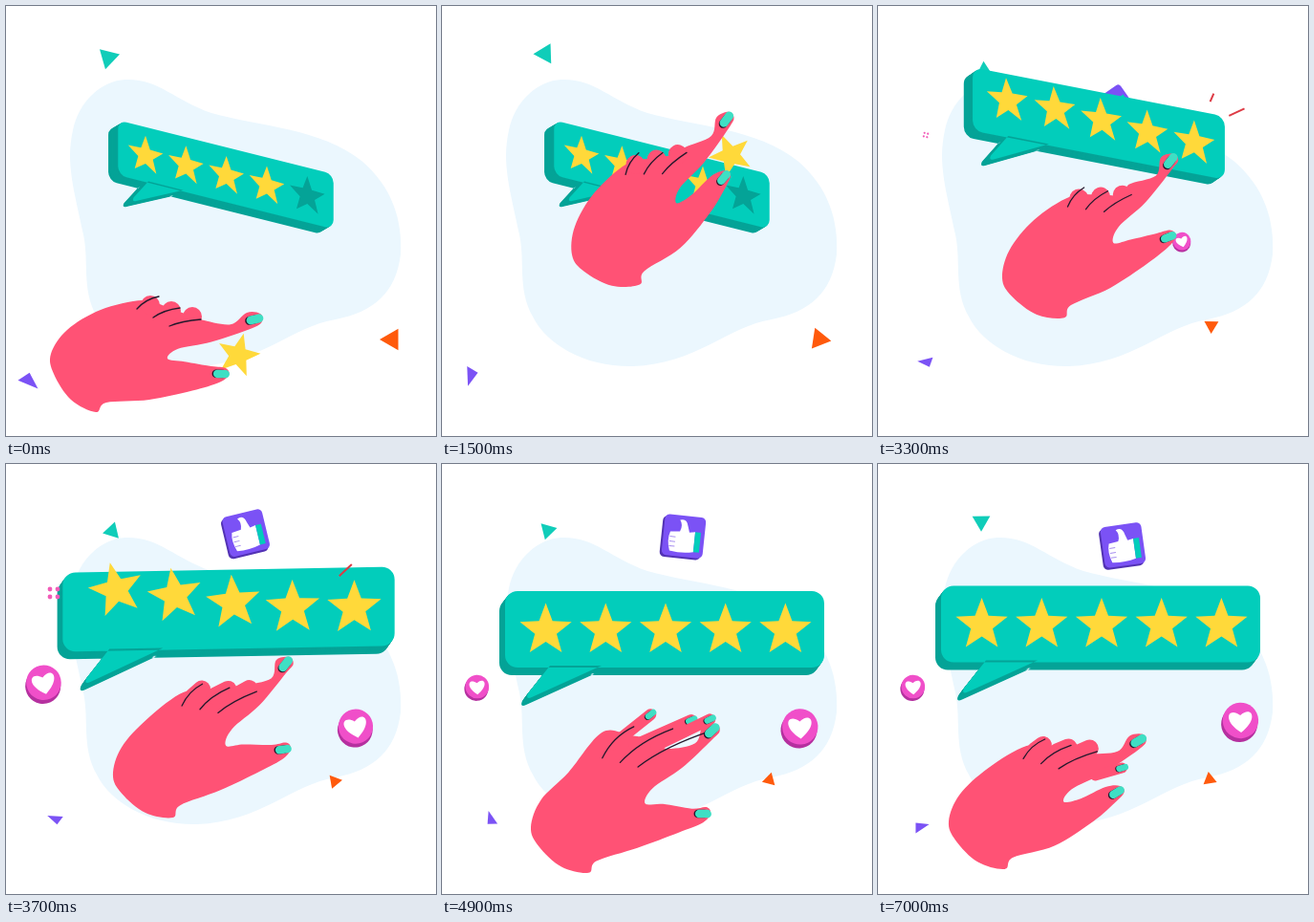
Recreate the animation shown at these times as an HTML page with a canvas. Size 450 by 450 pixels, loop 7100 ms.

```html
<!DOCTYPE html>
<html lang="en">
<head>
<meta charset="utf-8">
<title>Five star rating</title>
<style>
html, body { margin: 0; width: 100%; height: 100%; overflow: hidden; background: #fff; }
canvas { display: block; width: 450px; height: 450px; }
</style>
</head>
<body>
<canvas id="stage" width="450" height="450"></canvas>
<script>
const ctx = document.getElementById('stage').getContext('2d');
const LOOP = 7100, STEP = 100, PLACED = 2800;
const TEAL = '#02cdbb', DARK_TEAL = '#04a397', YELLOW = '#ffd93a', SKIN = '#ff5275',
      NAIL = '#3fdfc4', INK = '#24182c', PURPLE = '#7b52f5', PINK = '#f04fc9', ORANGE = '#ff5a0c';
const RAD = Math.PI / 180;

// Keys are [time, ...values]; monotone cubic between them, so holds stay still.
function at(keys, t) {
  const last = keys.length - 1;
  if (t <= keys[0][0]) return keys[0].slice(1);
  if (t >= keys[last][0]) return keys[last].slice(1);
  let k = 0;
  while (keys[k + 1][0] < t) k++;
  const a = keys[k], b = keys[k + 1], span = b[0] - a[0], u = (t - a[0]) / span, w = 1 - u;
  const slope = (i, c) => (keys[i + 1][c] - keys[i][c]) / (keys[i + 1][0] - keys[i][0]);
  const tangent = (i, c) => {
    if (i === 0) return slope(0, c);
    if (i === last) return slope(last - 1, c);
    const p = slope(i - 1, c), q = slope(i, c);
    return p * q > 0 ? 2 * p * q / (p + q) : 0;
  };
  return a.slice(1).map((v, j) => {
    const c = j + 1;
    return v * (1 + 2 * u) * w * w + b[c] * u * u * (3 - 2 * u)
      + span * u * w * (tangent(k, c) * w - tangent(k + 1, c) * u);
  });
}
const ramp = (t, from, to) => Math.min(1, Math.max(0, (t - from) / (to - from)));

function placed(x, y, angle, scale, draw) {
  ctx.save();
  ctx.translate(x, y);
  ctx.rotate(angle * RAD);
  ctx.scale(scale, scale);
  draw();
  ctx.restore();
}
function fill(color, path) {
  ctx.fillStyle = color;
  path ? ctx.fill(path) : ctx.fill();
}
function line(color, width, x1, y1, x2, y2) {
  ctx.strokeStyle = color;
  ctx.lineWidth = width;
  ctx.beginPath();
  ctx.moveTo(x1, y1);
  ctx.lineTo(x2, y2);
  ctx.stroke();
}
function disc(color, x, y, r) {
  ctx.beginPath();
  ctx.arc(x, y, r, 0, 7);
  fill(color);
}

const blob = new Path2D('M125 77C160 76 175 98 215 112C265 126 330 128 372 162C405 190 415 225 413 260C408 300 385 320 345 328C300 335 265 375 200 377C150 378 110 355 95 325C78 295 88 265 80 235C72 195 62 165 70 130C76 100 100 78 125 77Z');

// Triangles spin steadily while they drift; keys are time, x, y, scale
const even = [[1, 0], [1, 120], [1, 240]];
const triangles = [
  { color: '#10cdb9', corners: even, start: 104, spin: .0494,
    keys: [[0, 107, 54, 12.5], [900, 106, 45, 12.5], [2400, 111, 62, 11.5], [4100, 111, 71, 10], [7000, 108, 60, 10.8]] },
  { color: PURPLE, corners: [[13.5, 0], [10.5, 143], [8.5, -118]], start: 39, spin: .0433,
    keys: [[0, 23, 392, 1], [800, 21, 392, 1], [2400, 46, 375, .77], [4100, 53, 371, .72], [7000, 44, 380, .75]] },
  { color: ORANGE, corners: even, start: 60, spin: .0459,
    keys: [[0, 404, 349, 13], [800, 410, 352, 14], [2400, 365, 341, 10], [4100, 342, 331, 8], [7000, 347, 330, 8.2]] }
];
function drawTriangle({ color, corners, start, spin, keys }, t) {
  const [x, y, scale] = at(keys, t);
  placed(x, y, start + spin * t, scale, () => {
    ctx.beginPath();
    for (const [r, a] of corners) ctx.lineTo(r * Math.cos(a * RAD), r * Math.sin(a * RAD));
    fill(color);
  });
}

// Reaction icons
const heart = new Path2D('M0 12C-20 -2 -12 -16 0 -6C12 -16 20 -2 0 12Z');
const hearts = [
  [[3350, 115, 140, .2], [3750, 37, 233, 1], [4100, 37, 233, 1], [4800, 36.5, 234, .66]],
  [[3000, 290, 205, .1], [3300, 318, 247, .5], [3800, 370, 278, 1], [7000, 379, 270, 1]]
];
function drawHeart(keys, t) {
  if (t < keys[0][0]) return;
  const [x, y, scale] = at(keys, t);
  placed(x, y, 12 * ramp(t, 3300, 5000) - 15, scale, () => {
    disc('#b5309f', -1, 2, 19);
    disc(PINK, .5, -1.5, 18.7);
    ctx.translate(.5, -1);
    fill('#fff', heart);
  });
}

const thumbsUp = new Path2D('M-14 -4L-4 -5Q-1 -12 -5 -17Q2 -20 4 -11L6 -5L12 -6V15Q0 18 -13 16Q-17 5 -14 -4Z');
const thumbKeys = [[3000, 246, 130, -45, .5], [3300, 248, 104, -35, .75], [3750, 251, 72, -12, 1],
  [4900, 252.5, 76, 6, 1], [7000, 256, 85.5, -8, 1]];
function drawThumb(t) {
  if (t < thumbKeys[0][0]) return;
  placed(...at(thumbKeys, t), () => {
    for (const [color, x, y] of [['#5232b4', -23, -20], [PURPLE, -21, -22]]) {
      ctx.beginPath();
      ctx.roundRect(x, y, 43, 43, 5);
      fill(color);
    }
    fill('#fff', thumbsUp);
    ctx.fillStyle = TEAL;
    ctx.fillRect(12, -6, 6, 21);
    for (const y of [1, 6, 11]) line('#a890ef', 1, -14, y, -8, y);
  });
}

function drawSparks(t) {
  const size = ramp(t, 3050, 3600) * (1 - ramp(t, 4200, 4500));
  placed(50, 135, 25 * (1 - size), size, () => {
    for (const x of [-4, 4]) for (const y of [-4, 4]) disc('#f25bb8', x, y, 2.4);
  });
  const rays = [[-67, 3000, 3400, 38], [-43, 3550, 4200, 77], [-25, 3000, 3600, 51]];
  for (const [angle, from, to, reach] of rays) {
    const u = ramp(t, from, to), outer = reach * Math.min(1, u * 2) + 5 * u;
    if (u > 0 && u < 1) placed(335, 130, angle, 1, () =>
      line('#dd3b45', 2, outer - reach * .35 * Math.sin(Math.PI * u), 0, outer, 0));
  }
}

// Speech bubble: time, x, y, scale, skew
const bubbleKeys = [[PLACED, 230, 176.5, .675, 14], [3300, 231, 123, .79, 11], [3700, 233, 152, 1.04, -1],
  [4100, 233, 178, 1, 0], [4900, 233, 173, 1, 0], [7000, 233, 167.5, 1, 0]];
const bubble = new Path2D();
bubble.roundRect(-167, -40, 334, 80, 13);
bubble.addPath(new Path2D('M-120 38L-143 67Q-146 74 -139 71L-66 38Z'));
function star(color, r) {
  ctx.beginPath();
  for (let i = 0; i < 10; i++) {
    const a = (i * 36 - 90) * RAD, d = i % 2 ? r * .42 : r;
    ctx.lineTo(d * Math.cos(a), d * Math.sin(a));
  }
  fill(color);
}
function drawBubble(t) {
  const [x, y, scale, skew] = at(bubbleKeys, t);
  const slant = (dx, dy) => {
    ctx.translate(x + dx, y + dy);
    ctx.transform(scale, scale * Math.tan(skew * RAD), 0, scale * (1 + skew / 220), 0, 0);
  };
  for (let k = 8; k >= 0; k--) {
    ctx.save();
    slant(-(6 + .3 * skew) * k / 8, (8 - skew / 7) * k / 8);
    fill(k ? DARK_TEAL : TEAL, bubble);
    ctx.restore();
  }
  ctx.save();
  slant(0, 0);
  for (let i = 0; i < 5; i++) {
    // the hop runs from right to left and grows on the way
    const lag = t - 4100 + 200 * i, u = Math.min(1, Math.abs(lag) / (lag < 0 ? 1200 : 600));
    const hop = Math.cos(u * Math.PI / 2) ** 2 * (1 - i / 4) ** 2;
    const color = i === 4 && t < PLACED ? DARK_TEAL : YELLOW;
    placed((i - 2) * 62.7 + 1 + 15 * hop, 1 - 30 * hop, -17 * hop, 1, () => star(color, 28.5));
  }
  ctx.restore();
}

// Hand rig: time, wrist x, y, angle, index height, thumb height, how far the other fingers open
const handKeys = [
  [0, 47, 364, 0, -36, 21, 0], [800, 108, 292, -23, -46, 15, 0], [1400, 136, 261, -29, -46, 6, 0],
  [2400, 137, 262, -29, -46, 5, 0], [PLACED, 149, 298, -27, -46, 8, 0], [3300, 130, 285, -20, -55, 19, 0],
  [4100, 99, 370, -15, -60, 30, .6], [4900, 93, 380, -14, -52, 30, 1], [5400, 93, 380, -14, -52, 30, 1],
  [6500, 74, 374, -12, -41, 7, .2]
];

function smooth(points) {
  const n = points.length, p = i => points[(i + n) % n];
  ctx.beginPath();
  ctx.moveTo(...p(0));
  for (let i = 0; i < n; i++) {
    const [a, b, c, d] = [p(i - 1), p(i), p(i + 1), p(i + 2)];
    ctx.bezierCurveTo(b[0] + (c[0] - a[0]) / 6, b[1] + (c[1] - a[1]) / 6,
      c[0] - (d[0] - b[0]) / 6, c[1] - (d[1] - b[1]) / 6, c[0], c[1]);
  }
}
// A nail sits at x, y and points away from the joint
function nail(x, y, jointX, jointY, width) {
  const angle = Math.atan2(y - jointY, x - jointX) / RAD;
  placed(x, y, angle, width / 9, () => {
    line(INK, 9, -5.5, 0, 2, 0);
    line(NAIL, 9, -4, 0, 5, 0);
  });
}
function drawHand(t) {
  const [wristX, wristY, angle, iy, ty, open] = at(handKeys, t);
  const ix = 213 + (iy + 36) * .3, tx = 178;
  placed(wristX, wristY, angle, 1, () => {
    if (t < PLACED) placed(196, (iy + ty) / 2 + 9, 14 + angle * .3, 1, () => star(YELLOW, 23.5 - ramp(t, 2400, PLACED) * 3));
    ctx.lineCap = 'round';

    // palm and back, index finger, web, thumb, heel
    smooth([[0, 0], [17, -25], [52, -46], [96, -56 - 22 * open], [124, -48 - 20 * open], [150, -38 - 18 * open],
      [158, -14 + .6 * iy], [188, -2 + .8 * iy], [ix - 8, iy - 7], [ix + 6, iy - 6], [ix + 8, iy + 2], [ix - 2, iy + 9],
      [168, 8 + .57 * iy], [133, 2 + .2 * iy], [122, 5],
      [140, 4 + .2 * ty], [tx - 10, ty - 8], [tx + 5, ty - 6], [tx + 8, ty + 1], [tx - 2, ty + 9],
      [148, 28 + .5 * ty], [103, 48], [58, 51], [47, 61], [21, 48], [3, 21]]);
    fill(SKIN);

    // curled fingers are round knuckles that stretch as the hand opens
    [[46, -21], [64, -11], [61, -13]].forEach(([reachX, reachY], j) => {
      const x = 104 + 22 * j, y = -51 + 6 * j - 12 * open, endX = x + reachX * open, endY = y + reachY * open;
      line(SKIN, 20 - 8 * open, x, y, endX, endY);
      const size = 6.5 * ramp(open, .6, 1);
      if (size > 0) nail(endX, endY, x, y, size);
    });
    const under = ramp(t, 5600, 6400);
    if (under > 0) {
      line(SKIN, 11 * under, 160, -15, 189, -17);
      nail(189, -17, 160, -15, 6.5 * under);
    }

    ctx.strokeStyle = INK;
    ctx.lineWidth = 1.3;
    for (let j = 0; j < 3; j++) {
      const x = 90 + 17 * j, y = -47 + 9 * j - 5 * open;
      const endX = 113 + 22 * j + 17 * (j + 1) * open, endY = -60 + 12 * j - 16 * open;
      ctx.beginPath();
      ctx.moveTo(x, y);
      ctx.quadraticCurveTo(x + (endX - x) * .4, y + (endY - y) * .8, endX, endY);
      ctx.stroke();
    }
    nail(ix, iy, 150, -20, 9);
    nail(tx, ty, 140, 20, 8.5);
  });
}

function frame() {
  const t = Math.floor(performance.now() / STEP) * STEP % LOOP;
  ctx.fillStyle = '#fff';
  ctx.fillRect(0, 0, 450, 450);
  fill('#ebf7fe', blob);
  triangles.forEach(triangle => drawTriangle(triangle, t));
  drawThumb(t);
  hearts.forEach(keys => drawHeart(keys, t));
  drawBubble(t);
  drawSparks(t);
  drawHand(t);
  requestAnimationFrame(frame);
}
frame();
</script>
</body>
</html>
```
